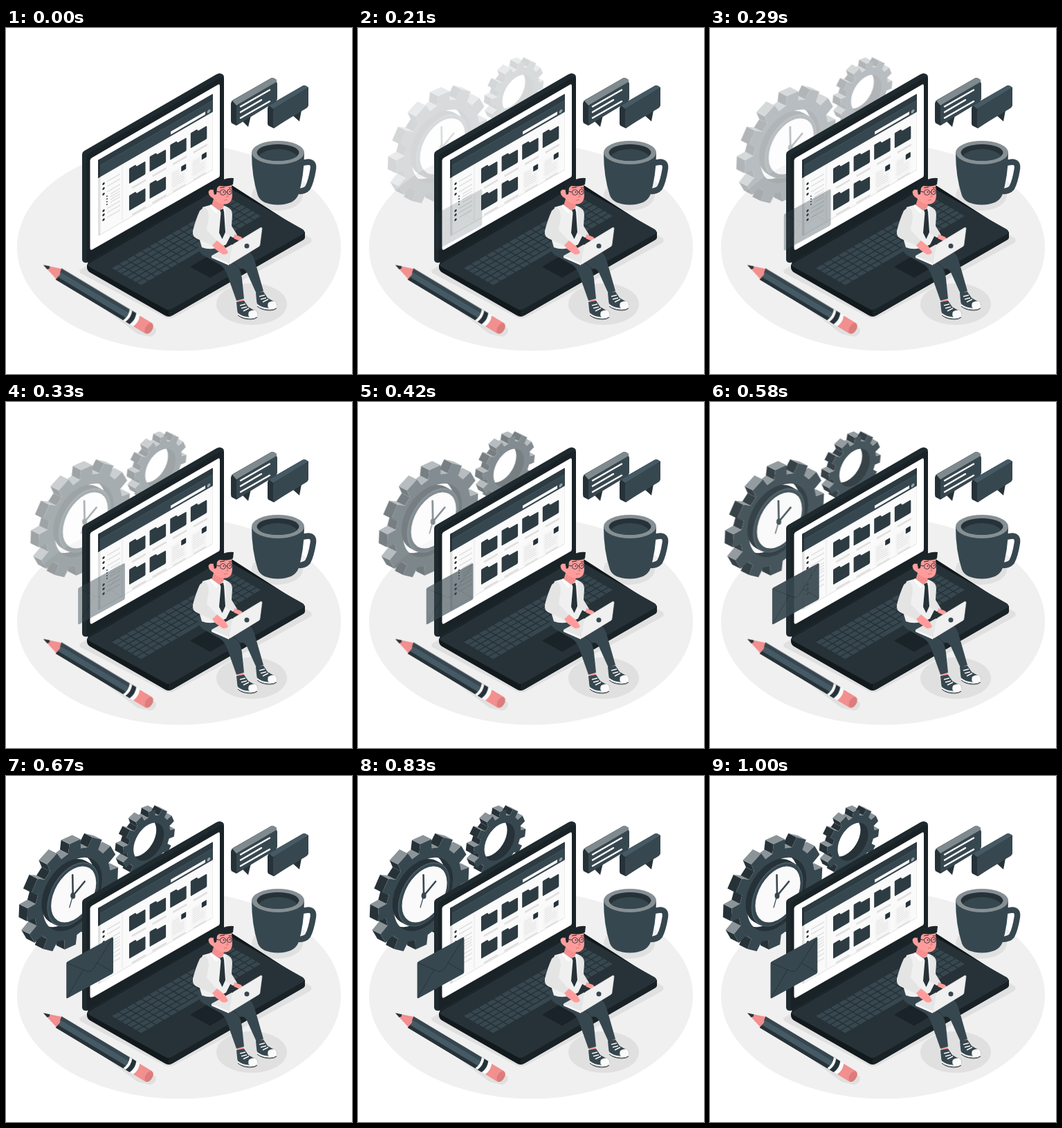
These frames come from a looping animation (500x500 px, 1040 ms). An HTML page:

```html
<!DOCTYPE html>
<html lang="en">
<head>
<meta charset="utf-8">
<title>Desk scene</title>
<style>
html, body { margin: 0; width: 100%; height: 100%; overflow: hidden; background: #fff; }
svg { display: block; width: 100vw; height: 100vh; }
</style>
</head>
<body>
<svg viewBox="0 0 500 500" xmlns="http://www.w3.org/2000/svg">
  <defs>
    <g id="shoe">
      <path d="M1 -1L10 -3L11 2L2 5Z" fill="#ff9c9b"/>
      <path d="M0 2L11 0L17 9Q23 13 29 15Q32 19 29 24Q20 28 8 24Q1 20 1 12Z" fill="#37474f"/>
      <path d="M18 16Q24 12 29 15Q32 20 29 23Q24 25 19 24Q16 21 18 16Z" fill="#fafafa"/>
      <path d="M2 19Q8 24 17 24.5Q25 25.5 30 22" fill="none" stroke="#fafafa" stroke-width="2"/>
      <path d="M2 21Q9 27 20 27Q27 27 30 24" fill="none" stroke="#263238" stroke-width="1"/>
      <path d="M5 7L13 5M7 11L15 9M10 15L18 11" stroke="#fafafa" stroke-width="1.5"/>
    </g>
  </defs>

  <!-- floor and shadows -->
  <ellipse cx="250" cy="317" rx="234" ry="149.5" fill="#f0f0f0"/>
  <g fill="#e0e0e0">
    <path d="M106 350L122 340L237 405L428 296L441 304Q443 308 439 311L243 418Q236 421 229 418L107 354Z"/>
    <ellipse cx="355" cy="399" rx="51" ry="30"/>
    <ellipse cx="392" cy="242" rx="37" ry="22"/>
    <path d="M76 356L88 352L216 434Q219 443 208 446L190 442Z"/>
  </g>

  <g id="gears"></g>

  <!-- laptop base -->
  <path d="M117 343L122 330L315 220L432 295V302Q432 305 428 307L241 415Q235 419 229 415L121 353Q117 350 117 346Z" fill="#12191c"/>
  <path d="M120 340L315 227L429 291Q434 295 429 298L240 406Q235 409 230 406L120 345Q116 342 120 340Z" fill="#263238"/>
  <path d="M235 408V417L241 415L428 307Q432 305 432 302V295L429 298L240 406Z" fill="#192226"/>
  <path d="M266 345L290 331L319 347L295 361Z" fill="#1a2327"/>
  <g id="keys" transform="matrix(1 -.577 1 .577 153 347)" fill="#37474f"></g>

  <!-- lid and screen -->
  <path d="M110 183Q110 179 114 177L304 67Q309 64 313 67Q315 68 315 72V226L122 338L117 339Q110 340 110 334Z" fill="#1f2a2f"/>
  <path d="M116 187Q116 183 120 181L309 72Q315 69 315 75V225L119 338Q116 338 116 334Z" fill="#192226"/>
  <path d="M121.500 192Q121.500 189 125 187L306 82Q309 80 309 84V212Q309 215 307 216L125 320Q121.500 322 121.500 318Z" fill="#fff"/>
  <g id="page" transform="translate(133 191) skewY(-30)"></g>

  <!-- chat bubbles -->
  <path d="M341 134L350 143L354 126Z" fill="#263238"/>
  <path d="M325 109Q325 106 328 104L382 73Q385 71 388 73L391 75V104L333 141L327 138Q325 137 325 134Z" fill="#263238"/>
  <path d="M327 105L382 73Q385 71 388 73L391 75Q392 77 390 79L333 112Z" fill="#7f8a8f"/>
  <path d="M333 115Q333 112 336 110L389 79Q392 77 392 81V102Q392 105 389 107L336 139Q333 141 333 137Z" fill="#37474f"/>
  <path d="M339 113.500L381 89.500M339 121.500L369 104M339 130L381 106" stroke="#fff" stroke-width="2.500" stroke-linecap="round"/>
  <path d="M415 127L424 135L427 119Z" fill="#263238"/>
  <path d="M378 116Q378 113 381 111L428 84Q431 82 434 84L437 86V112L387 145L381 142Q378 141 378 138Z" fill="#263238"/>
  <path d="M380 112L428 84Q431 82 434 84L437 86L386 117Z" fill="#455a64"/>
  <path d="M386 120Q386 117 389 115L434 88Q437 86 437 90V111Q437 114 434 116L389 143Q386 145 386 141Z" fill="#37474f"/>

  <!-- mug -->
  <path d="M427 195L437 193.500Q445 194 444 203Q441 222 436 231Q432 236 422 236" fill="none" stroke="#37474f" stroke-width="8.500"/>
  <path d="M355 180Q355 215 364 242Q369 255 393 255.500Q416 255 422 242Q431 215 431 180Z" fill="#37474f"/>
  <ellipse cx="393" cy="180" rx="38" ry="17" fill="#858f94"/>
  <ellipse cx="393" cy="180" rx="30.500" ry="12" fill="#263238"/>
  <path d="M365 185Q374 175 393 175Q412 175 421 185Q413 192 393 192Q373 192 365 185Z" fill="#37474f"/>

  <!-- pencil -->
  <g transform="translate(54 342.500) rotate(31)">
    <path d="M0 0L27 -9.500L30 0L27 8Z" fill="#f28f8f"/>
    <path d="M0 0L9 -3.200L10 0L8 2.600Z" fill="#263238"/>
    <path d="M25 -9.500H150V9H26Q29 6 27 3Q29 0 26 -4Z" fill="#37474f"/>
    <path d="M27 -4H150V4H27Q29 0 27 -4Z" fill="#455a64"/>
    <path d="M27 4H150V9H26Z" fill="#263238"/>
    <path d="M140 -9.500H159Q163 0 159 9H140Q144 0 140 -9.500Z" fill="#fafafa"/>
    <path d="M144 -9.500H151Q155 0 151 9H144Q148 0 144 -9.500Z" fill="#263238"/>
    <path d="M157 -9H177Q183 -8 183 0Q183 8 177 9H157Q161 0 157 -9Z" fill="#f28f8f"/>
    <ellipse cx="178" cy="0" rx="5" ry="8.500" fill="#dc7c7c"/>
  </g>

  <!-- person -->
  <use href="#shoe" x="361" y="381"/>
  <use href="#shoe" x="333" y="394"/>
  <path d="M310 330L348 321Q357 325 360 338L372 380L362 384L348 353Q344 346 336 348Z" fill="#37474f"/>
  <path d="M277 312Q277 326 290 331L311 343Q318 349 322 363L333 394L344 391L341 362Q339 346 329 340L318 322L314 313Z" fill="#37474f"/>
  <path d="M318 322L329 340Q339 346 340 356" fill="none" stroke="#263238" stroke-width=".8"/>
  <path d="M284 259L298 255L316 257Q326 260 326 272V297L318 313Q299 323 283 317L278 300Z" fill="#f0f0f0"/>
  <path d="M318 258Q327 261 327 270L326 286L334 299L328 303L318 297Z" fill="#e6e6e6"/>
  <path d="M300 247L315 253L314 261L308 265L297 257Z" fill="#f28f8f"/>
  <path d="M296 255L308 264L315 259L318 264L312 268L308 265L304 270L294 259Z" fill="#fafafa" stroke="#e0e0e0" stroke-width=".5"/>
  <path d="M309 263L314 261L315 266L317 295L312.500 305L308 296L310.500 267Z" fill="#263238"/>
  <path d="M302 229L326 226L327 242Q327 251 320 254Q311 256 303 250L299 246Q293 243 292.500 237Q294 232 299 234Z" fill="#ff9c9b"/>
  <path d="M300 236L299 229Q298 223 301 220Q308 218 314 219Q322 216 329 217L328 226Q321 230 308 228L305 231L304 240L301 241Z" fill="#1b2529"/>
  <path d="M302 236L309 237M318 237L320 237M309 231L316 230M322 231L326 231" stroke="#263238" stroke-width="1.100"/>
  <g fill="none" stroke="#263238" stroke-width=".9">
    <circle cx="313.500" cy="237.500" r="4"/><ellipse cx="323" cy="236.800" rx="3.200" ry="3.800"/>
  </g>
  <circle cx="314.500" cy="237" r=".9" fill="#263238"/><circle cx="323.500" cy="236.500" r=".9" fill="#263238"/>
  <path d="M319 239L321 244L318 244M315 249L320 248" fill="none" stroke="#c96868" stroke-width=".9"/>
  <path d="M330 298L340 302L343 306L338 308L329 304Z" fill="#ff9c9b"/>
  <path d="M297 329L326 313L366 315L322 342Z" fill="#e6e6e6"/>
  <path d="M297 329L322 340V343L297 332Z" fill="#fafafa"/>
  <path d="M286 259Q293 262 293 273L290 292L305 308L299 315L275 304Q269 301 270 293Q274 277 280 264Z" fill="#e4e4e4"/>
  <path d="M298 314L305 307L316 316L321 324Q319 328 313 327L303 320Z" fill="#ff9c9b"/>
  <path d="M326 316Q326 314 329 312L367 289Q370 287 370 290L367 313Q367 315 365 316L324 341Q321 342 322 339Z" fill="#f0f0f0" stroke="#e0e0e0" stroke-width=".6"/>
  <circle cx="348" cy="315" r="3.500" fill="#37474f"/>

  <g id="mail">
    <path d="M87.500 271Q87.500 269 89.500 268L153 233.500Q155.300 232 155.300 235V283Q155.300 285 153.500 286L89.500 321Q87.500 322 87.500 320Z" fill="#37474f"/>
    <path d="M88.500 270L117 282Q123 284 127 278L154 235M89 319L112 280M154 283L132 270" fill="none" stroke="#263238" stroke-width=".9"/>
  </g>
</svg>
<script>
const el = id => document.getElementById(id);
const rect = (x, y, w, h, fill, rx = 0) =>
  `<rect x="${x}" y="${y}" width="${w}" height="${h}" rx="${rx}"${fill ? ` fill="${fill}"` : ''}/>`;
const poly = (pts, fill) =>
  `<polygon points="${pts.map(p => p.map(n => n.toFixed(1)).join()).join(' ')}" fill="${fill}"/>`;
const DARK = '#263238', MAIN = '#37474f', PALE = '#e0e0e0';

// A circle lying in the upright isometric plane
const disc = (x, y, r, fill) =>
  `<circle r="${r}" fill="${fill}" transform="matrix(.88 -.45 0 1 ${x} ${y})"/>`;

function gear(cx, cy, r, root, hole, dx, dy, phase) {
  const pts = [];
  const add = (deg, rad) => {
    const a = deg * Math.PI / 180, u = rad * Math.cos(a), v = rad * Math.sin(a);
    pts.push([cx + .88 * u, cy - .45 * u + v]);
  };
  for (let i = 0; i < 12; i++) {
    const a = phase + 30 * i;
    add(a - 9.5, root); add(a - 7, r); add(a + 7, r); add(a + 9.5, root);
  }
  let sides = '';
  pts.forEach((p, i) => {
    const q = pts[(i + 1) % pts.length];
    const ex = q[0] - p[0], ey = q[1] - p[1];
    if (ey * dx - ex * dy <= 0) return;
    const lit = -ex / Math.hypot(ex, ey) < -.6;
    sides += poly([p, q, [q[0] + dx, q[1] + dy], [p[0] + dx, p[1] + dy]], lit ? '#8b9498' : DARK);
  });
  const id = 'hole' + Math.round(cx);
  return `<clipPath id="${id}">${disc(cx, cy, hole, '#000')}</clipPath>` + sides + poly(pts, MAIN) +
    disc(cx, cy, hole, DARK) +
    `<g clip-path="url(#${id})">${disc(cx + dx, cy + dy, hole, '#fff')}</g>`;
}

function clock(cx, cy) {
  let s = '';
  for (let k = 8; k > 0; k--) s += disc(cx - k, cy - k * .57, 42.5, DARK);
  return s + disc(cx, cy, 42.5, '#455a64') + disc(cx + .5, cy + .5, 41, MAIN) + disc(cx + 1, cy, 37, '#fafafa') +
    `<g stroke="${MAIN}" stroke-linecap="round">
      <path d="M97 173L96.500 143" stroke-width="2.600"/><path d="M97 173L114 152.500" stroke-width="2.600"/>
      <path d="M98 169L92 190" stroke-width="1.200"/></g>
    <ellipse cx="97" cy="173" rx="3.500" ry="4.500" fill="${MAIN}"/>`;
}

el('gears').innerHTML = gear(206.5, 95, 43, 35, 25, -11, -6, -82) +
  gear(96.5, 171, 75, 62, 48.5, -12, -6, -87) + clock(97, 171);

// Keyboard rows, the last one with a long space bar
let keys = '';
for (let row = 0; row < 6; row++) {
  for (let col = 0; col < 16; col++) {
    const space = row === 5 && col > 4 && col < 10;
    if (space && col > 5) continue;
    keys += rect(col * 10.9, row * 7.3, space ? 53 : 9.4, 5.8, '', .8);
  }
}
el('keys').innerHTML = keys;

// Browser page on the screen
let page = rect(0, 0, 166, 110, PALE, 1.5) + rect(3.5, 1, 162, 108, '#fafafa', 1) +
  rect(0, 0, 166, 26, MAIN, 1) + rect(0, 0, 166, 9.5, '#2d3b42', 1) + rect(0, 0, 3, 26, DARK) +
  rect(3, 9.2, 163, .7, '#455a64') + rect(105, 19.3, 50, 4.2, '#fff') +
  `<circle cx="160" cy="21.800" r="2.400" fill="#90a4ae"/>` + rect(34.6, 27, .8, 80, PALE);
const item = (x, y, r) => {
  page += `<circle cx="${x}" cy="${y}" r="${r}" fill="${DARK}"/>` + rect(x + 5, y - 1, 27 - x, 1.6, PALE);
};
[38.6, 45.6, 53.6, 77.6, 83.6, 90.6].forEach(y => item(8, y, 1.7));
[59.5, 63.5, 67.5, 71.5].forEach(y => item(13, y, .9));
for (let i = 0; i < 8; i++) {
  const x = 45 + 29.6 * (i % 4), y = i < 4 ? 38 : 77;
  if (i < 6) {
    page += `<path d="M${x} ${y + 1}q0 -1 1 -1h8l2 3h11q1.500 0 1.500 1.500v16q0 1.500 -1.500 1.500h-21q-1 0 -1 -1z" fill="#2d3b42"/>` +
      rect(x + 4, y + 29, 20, 3, PALE);
  } else {
    page += rect(x + 1, y + 1, 22, 28, '#f5f5f5');
    for (let k = 0; k < 7; k++) page += rect(x + 3, y + 5 + k * 3, k < 3 ? 10 : 17, .9, PALE);
    page += rect(x + 16, y + 1.5, 7, 7.5, DARK, 1) + rect(x + 4, y + 30, 18, 2.5, PALE);
  }
}
el('page').innerHTML = page;

// cubic-bezier(.36, -.01, .5, 1.38)
const bez = (s, a, b) => 3 * (1 - s) * (1 - s) * s * a + 3 * (1 - s) * s * s * b + s * s * s;
function ease(x) {
  if (x >= 1) return 1;
  let lo = 0, hi = 1;
  for (let i = 0; i < 24; i++) {
    const mid = (lo + hi) / 2;
    if (bez(mid, .36, .5) < x) lo = mid; else hi = mid;
  }
  return bez(lo, -.01, 1.38);
}

// Steps at 24 per second, looping every 1040 ms
const LOOP = 1040, STEP = 1000 / 24, LEAD = 25;
const parts = [el('gears'), el('mail')];
const start = performance.now();
function draw(now) {
  const t = Math.max(0, now - start) % LOOP;
  const step = Math.min(24, Math.floor((t + 4) / STEP));
  const p = step ? ease((step * STEP + LEAD) / 1000) : 0;
  for (const part of parts) {
    part.setAttribute('transform', `translate(${(30 * (1 - p)).toFixed(2)} 0)`);
    part.setAttribute('opacity', Math.min(1, Math.max(0, p)).toFixed(3));
  }
  requestAnimationFrame(draw);
}
draw(start);
</script>
</body>
</html>
```
